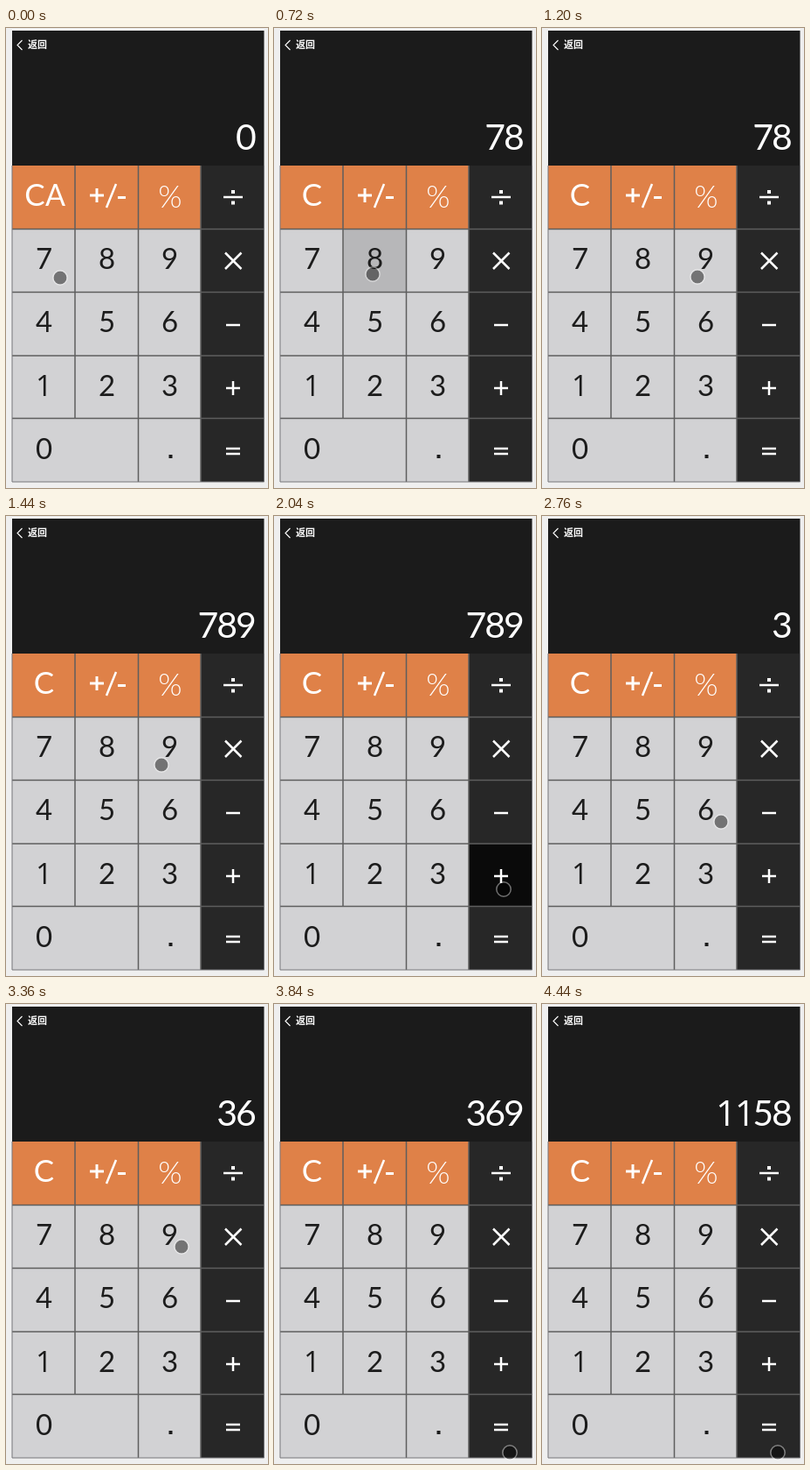
Recreate the animation shown at these times as an HTML page with a canvas. Size 300 by 525 pixels, loop 4.8 s.

```html
<!DOCTYPE html>
<html lang="zh">
<head>
<meta charset="utf-8">
<title>Calculator</title>
<style>
  html, body { margin: 0; width: 100%; height: 100%; overflow: hidden; background: #efefef; }
  canvas { display: block; }
</style>
</head>
<body>
<canvas id="stage" width="300" height="525"></canvas>
<script>
const ctx = document.getElementById('stage').getContext('2d');
const LOOP = 4800, STEP = 120;
const xs = [7, 79, 151.5, 223, 295.5];
const ys = [157, 229.5, 301.5, 374, 445.5, 518];
const digits = [['7', '8', '9'], ['4', '5', '6'], ['1', '2', '3'], ['0']];

// time, column, row, display after the press, fade time
const presses = [
  [240, 0, 1, '7', 120], [720, 1, 1, '78', 120], [1320, 2, 1, '789', 120],
  [2040, 3, 3, '789', 120], [2520, 2, 3, '3', 120], [3000, 2, 2, '36', 120],
  [3600, 2, 1, '369', 120], [4080, 3, 4, '1158', 360]
];

// time, x, y of the pointer
const path = [
  [0, 62, 285], [240, 62, 285], [600, 113, 281], [840, 113, 281],
  [1200, 178, 284], [1440, 178, 284], [1800, 263, 426], [2160, 263, 426],
  [2520, 203, 424], [2640, 203, 424], [2760, 205, 349], [3000, 205, 349],
  [3360, 201, 277], [3600, 201, 277], [3840, 270, 512], [LOOP, 270, 512]
];

function box(x, y, x2, y2, color) {
  ctx.fillStyle = color;
  ctx.fillRect(x, y, x2 - x, y2 - y);
}

function line(color, width, ...p) {
  ctx.strokeStyle = color;
  ctx.lineWidth = width;
  ctx.beginPath();
  for (let i = 0; i < p.length; i += 2) ctx.lineTo(p[i], p[i + 1]);
  ctx.stroke();
}

function text(s, x, y, size, color, weight = 400, align = 'center') {
  // The footless "1" comes from a second face.
  const family = s === '1' ? '"Open Sans", "Noto Sans"' : 'Lato, "Noto Sans CJK SC", "Noto Sans CJK"';
  ctx.font = `${weight} ${size}px ${family}, sans-serif`;
  ctx.textAlign = align;
  ctx.fillStyle = color;
  ctx.fillText(s, x, y);
}

function drawKeys(t) {
  box(7, 157, 223, 229.5, '#df8148');
  box(7, 229.5, 223, 518, '#d2d2d4');
  box(223, 157, 295.5, 518, '#272727');
  for (const [start, col, row, , fade] of presses) {
    if (t < start || t >= start + fade) continue;
    const alpha = (col === 3 ? 0.74 : 0.13) * (1 - (t - start) / fade);
    box(xs[col], ys[row], xs[col + 1], ys[row + 1], `rgba(0,0,0,${alpha})`);
  }
  const rule = '#5e5e5e';
  for (const y of ys.slice(1, 5)) line(rule, 1.5, 7, y, 295.5, y);
  line(rule, 1.5, 79, 157, 79, 445.5);
  line(rule, 1.5, 151.5, 157, 151.5, 518);
  line(rule, 1.5, 223, 157, 223, 518);
  line('#77777a', 1, 7, 157, 7, 518, 295.5, 518, 295.5, 157);
}

function drawLabels(cleared) {
  const w = '#fff';
  if (cleared) {
    text('C', 33, 203, 35, w);
    text('A', 56.5, 203, 34, w);
  } else text('C', 43.5, 203, 35, w);
  line(w, 3, 96, 191, 112, 191);
  line(w, 3, 104, 183, 104, 199);
  line(w, 2.5, 115, 205, 126, 178);
  line(w, 3, 128, 193.5, 137, 193.5);
  text('%', 188, 205, 35, w, 300);

  digits.forEach((row, r) => row.forEach((d, c) =>
    text(d, 43.5 + 72 * c, [275, 347, 420, 492][r], 33, '#1c1c1c')));
  box(186.5, 487, 190.5, 491, '#1c1c1c');

  line(w, 2.5, 249, 193, 271, 193);
  box(258, 185, 262, 189, w);
  box(258, 197.5, 262, 201.5, w);
  line(w, 2.5, 251, 256.5, 269.5, 275);
  line(w, 2.5, 269.5, 256.5, 251, 275);
  line(w, 2.5, 252, 339, 268, 339);
  line(w, 2.5, 252, 411, 268, 411);
  line(w, 2.5, 260, 403, 260, 419);
  line(w, 2.5, 252, 480, 268, 480);
  line(w, 2.5, 252, 486, 268, 486);
}

function drawDisplay(value) {
  box(7, 3, 295.5, 157, '#1b1b1b');
  line('#fff', 1.1, 18.5, 14, 13, 19.5, 18.5, 25);
  text('返回', 25, 23, 11, '#fff', 700, 'left');
  [...value].reverse().forEach((d, i) =>
    text(d, 275 - 21.8 * i + (d === '1' ? 1 : 0), 138.5, 41, '#fff'));
}

function drawPointer(t) {
  const i = path.findIndex(p => p[0] > t);
  const [t0, x0, y0] = path[i - 1], [t1, x1, y1] = path[i];
  const k = (t - t0) / (t1 - t0);
  const x = x0 + (x1 - x0) * k, y = y0 + (y1 - y0) * k;
  ctx.fillStyle = 'rgba(0,0,0,0.45)';
  ctx.beginPath();
  ctx.arc(x, y, 7.5, 0, 7);
  ctx.fill();
  ctx.strokeStyle = 'rgba(255,255,255,0.42)';
  ctx.lineWidth = 1.5;
  ctx.beginPath();
  ctx.arc(x, y, 8.2, 0, 7);
  ctx.stroke();
}

function draw(now) {
  const t = Math.floor(now % LOOP / STEP) * STEP;
  const last = presses.filter(p => p[0] <= t).pop();
  box(0, 0, 300, 525, '#efefef');
  drawKeys(t);
  drawDisplay(last ? last[3] : '0');
  drawLabels(!last);
  drawPointer(t);
  requestAnimationFrame(draw);
}

draw(performance.now());
</script>
</body>
</html>
```
